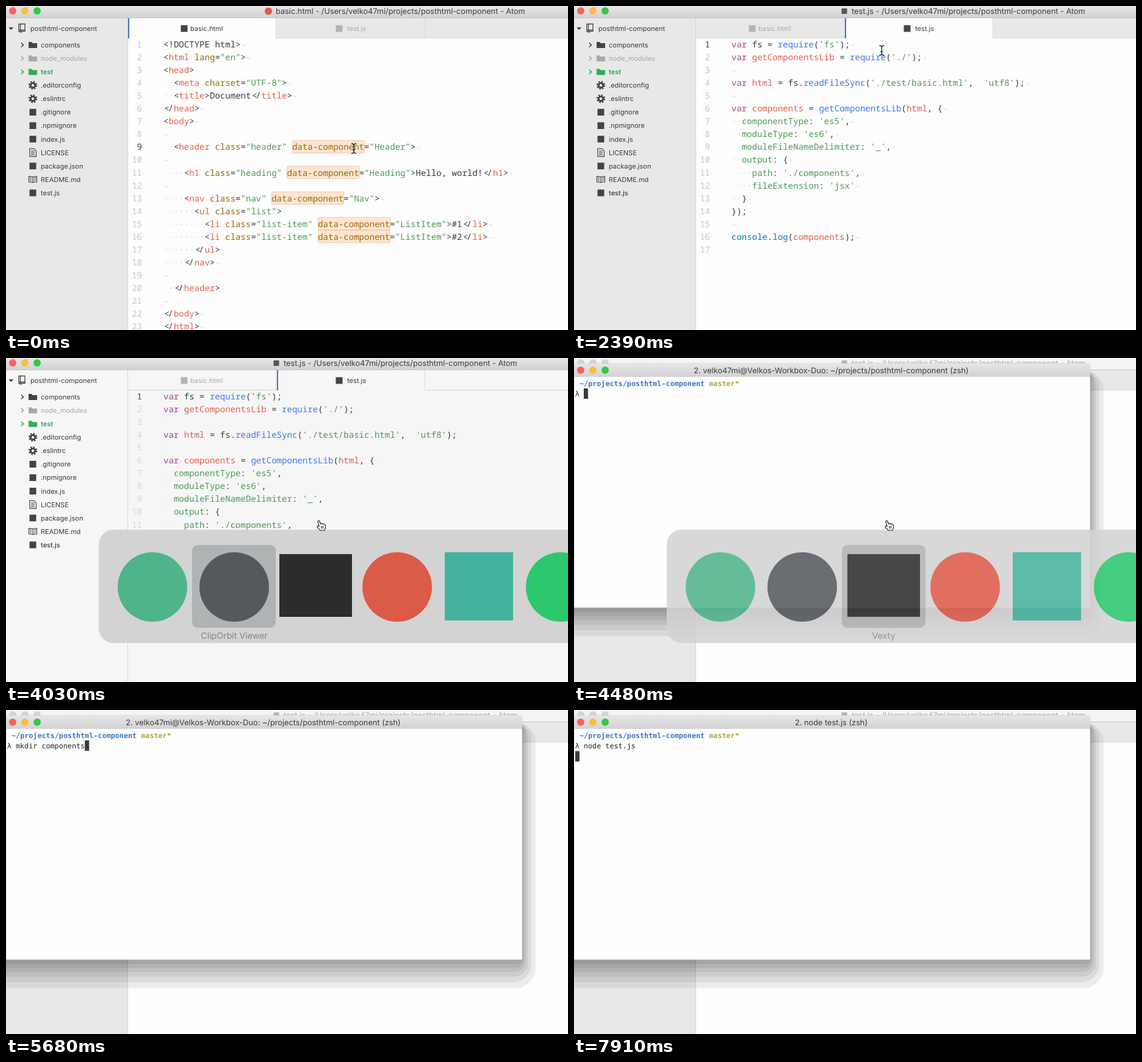
An HTML page that plays this animation: 921 px wide and 532 px high, repeating every 8000 ms.

```html
<!DOCTYPE html>
<html lang="en">
<head>
<meta charset="utf-8">
<title>Editor and terminal</title>
<style>
  html, body { margin: 0; width: 100%; height: 100%; overflow: hidden; background: #fdfdfd; }
  svg { display: block; width: 100vw; height: 100vh; }
  text { white-space: pre; text-rendering: geometricPrecision; font: 11px Inter, sans-serif; fill: #3a3a3a; }
  .title { font-size: 12.75px; fill: #3c3c3c; }
  .code text { font: 14.07px "Noto Sans Mono", monospace; fill: #383a42; }
  .code .num { fill: #c6c6c6; text-anchor: end; }
  .code .current { fill: #444; }
  .ws { fill: #d2d2d2; }
  .eol { fill: #d2d2d2; font-size: 11px; }
  .red { fill: #e0604c; } .gold { fill: #9a6a0a; } .green { fill: #4b9a55; }
  .purple { fill: #a0409f; } .blue { fill: #4078e8; } .cyan { fill: #0a78b8; font-weight: 500; }
  .mark { fill: #fde5d3; stroke: #f2c5a5; }
  .panel { fill: #e8e8e8; }
  .paper { fill: #fdfdfd; }
  .muted { fill: #a8a8a8; }
  .pale .panel, .pale .paper { fill: #f6f6f6; }
  .pale .ws, .pale .eol { fill: #ececec; }
  .pale .code .num:not(.current) { fill: #d6d6d6; }
  .inactive .title { fill: #aaa; }
  .inactive .bar { fill: #f5f5f5; }
  .inactive .light { fill: #d4d4d4; }
  .term text { font: 11.75px "DejaVu Sans Mono", monospace; fill: #222; }
  .term .title { font: 12.75px Inter, sans-serif; fill: #3c3c3c; text-anchor: middle; }
  .term .path { font-weight: bold; fill: #3a74c8; }
  .term .branch { font-weight: bold; fill: #b8a640; }
  .label { font-size: 14.2px; fill: #858585; text-anchor: middle; }
</style>
</head>
<body>
<svg viewBox="0 0 921 532" preserveAspectRatio="none">
  <defs>
    <linearGradient id="bar" x2="0" y2="1"><stop stop-color="#e6e6e6"/><stop offset="1" stop-color="#d2d2d2"/></linearGradient>
    <g id="gear" fill="none" stroke="#444">
      <circle r="3.7" stroke-width="3"/><circle r="6" stroke-width="2.4" stroke-dasharray="2.36 2.35"/>
    </g>
    <path id="folder" d="M-7-5h5l1.5 2h7.5v8h-14z"/>
    <path id="file" d="M-5-6.5h7l3.5 3.5v9.5h-10.5zM-3-2.5h6M-3 .5h6M-3 3.5h6" fill="none" stroke="#444" stroke-width="1.2"/>
    <path id="book" d="M0-4C-2-5-4-5-6.5-5V4C-4 4-2 4 0 5C2 4 4 4 6.5 4V-5C4-5 2-5 0-4V5M-5-2h3M-5 1h3M2-2h3M2 1h3" fill="none" stroke="#444" stroke-width="1.2"/>
    <path id="repo" d="M-5-6.5h10v10h-10zM-2.5-6.5v10M-5 3.5v2h2v1.5l1-1 1 1v-1.5h6v-2" fill="none" stroke="#444" stroke-width="1.3"/>
    <rect id="badge" x="-5.5" y="-5.5" width="11" height="11"/>
    <path id="arrow" d="M0 0V13.5L3.2 10.6 5.2 15.3 7.4 14.3 5.4 9.8H9.6Z" fill="#111" stroke="#fff"/>
    <path id="beam" d="M-4-8Q0-8 0-5Q0-8 4-8M0-5V5M-4 8Q0 8 0 5Q0 8 4 8M-2 2H2" fill="none" stroke="#222" stroke-width="1.4"/>
    <path id="hand" d="M-3 1L-5-6Q-4.5-9-2.5-7.5L-.5-2.5Q1-4 2.5-2.5Q4-3.5 5-2Q7-2.5 7.5 0V4L6 8H-1L-6 2.5Q-6-.5-3 1ZM1 1V5M3.5 1V5" fill="#fff" stroke="#222" stroke-width="1.2"/>
  </defs>

  <g id="editor">
    <rect class="paper" width="921" height="532"/>
    <rect class="panel" y="20" width="199" height="512"/>
    <rect class="panel" x="200" y="20" width="721" height="33"/>
    <path d="M199.5 20V532M200 52.5H921" stroke="#d4d4d4"/>
    <rect class="bar" width="921" height="19" fill="url(#bar)"/>
    <path d="M0 19.5H921" stroke="#c2c2c2"/>
    <g class="lights" transform="translate(0 8)"></g>
    <g id="titleIcon"></g>
    <text id="title" class="title" y="13"></text>
    <g id="sidebar"></g>
    <g id="tabs"></g>
    <g id="html" class="code"></g>
    <g id="js" class="code"></g>
  </g>

  <g id="term" class="term">
    <g id="shadow"></g>
    <path d="M0 9H841Q846 9 846 14V410H0Z" fill="#fefefe" stroke="#b4b4b4" stroke-width=".6"/>
    <path d="M0 9H841Q846 9 846 14V31H0Z" fill="url(#bar)"/>
    <g class="lights" transform="translate(0 20)"></g>
    <text id="termTitle" class="title" x="421.5" y="25"></text>
    <text class="path" x="9" y="46">~/projects/posthtml-component <tspan class="branch">master*</tspan></text>
    <text id="command" x="1.8" y="63"></text>
    <rect id="block" width="7" height="17" fill="#3a3a3a"/>
  </g>

  <g id="switcher">
    <rect x="152" y="282" width="820" height="186" rx="24" fill="#d3d3d3"/>
    <rect id="pick" y="307" width="137" height="136" rx="9" fill="#b0b3b3"/>
    <circle cx="240" cy="376" r="57" fill="#4fb48a"/>
    <circle cx="374" cy="376" r="57" fill="#55585d"/>
    <rect x="448" y="322" width="119" height="103" fill="#2c2c2c"/>
    <circle cx="641" cy="376" r="57" fill="#dc5a48"/>
    <rect x="719" y="319" width="112" height="112" fill="#45b29d"/>
    <circle cx="909" cy="376" r="57" fill="#2cc76d"/>
    <text id="label" class="label" y="461"></text>
  </g>
  <use id="pointer"/>
</svg>
<script>
const $ = id => document.getElementById(id);
const show = (id, on) => $(id).style.display = on ? '' : 'none';
const escape = s => s.replace(/&/g, '&amp;').replace(/</g, '&lt;');
const icon = (name, x, y, fill = '#444') => `<use href="#${name}" x="${x}" y="${y}" fill="${fill}"/>`;

// Code panes
const CELL = 8.444, LEFT = 258, ROW = 21.05, BASE = 68;

const htmlRules = [
  [/^ +/y, 'ws'], [/<\/?/y, ''], [/(?<=<\/?)\w+/y, 'red'],
  [/[\w-]+(?==)/y, 'gold'], [/"[^"]*"/y, 'green'], [/[^<"]/y, '']
];
const jsRules = [
  [/^ +/y, 'ws'], [/'[^']*'/y, 'green'], [/var\b/y, 'purple'], [/\w+(?=:)/y, 'green'],
  [/console|log(?=\()/y, 'cyan'], [/\w+(?=\()/y, 'blue'],
  [/getComponentsLib|components|html/y, 'red'], [/\w+/y, ''], [/./y, '']
];

function colour(line, rules) {
  let out = '', at = 0, joined = false;
  while (at < line.length) {
    for (const [rule, cls] of rules) {
      rule.lastIndex = at;
      const found = rule.exec(line);
      if (!found) continue;
      const word = cls === 'ws' ? '·'.repeat(found[0].length) : found[0];
      at += word.length;
      out += word === '</'
        ? '<tspan dx="1.5">&lt;</tspan><tspan dx="-2.5">/</tspan>'
        : `<tspan class="${cls}"${joined ? ' dx="1"' : ''}>${escape(word)}</tspan>`;
      joined = word === '</';
      break;
    }
  }
  return out;
}

function codePane(source, rules, current, marked) {
  const lines = source.split('\n');
  return lines.map((line, i) => {
    const y = BASE + i * ROW, col = marked ? line.indexOf(marked) : -1;
    const mark = col < 0 ? '' : `<rect class="mark" x="${LEFT + col * CELL}" y="${y - 15.5}" width="${marked.length * CELL}" height="20.5" rx="2"/>`;
    const end = i < lines.length - 1 || marked ? '<tspan class="eol" dx="1">¬</tspan>' : '';
    return mark +
      `<text class="num${i + 1 === current ? ' current' : ''}" x="223" y="${y}">${i + 1}</text>` +
      `<text x="${LEFT}" y="${y}">${colour(line, rules)}${end}</text>`;
  }).join('');
}

$('html').innerHTML = codePane(`<!DOCTYPE html>
<html lang="en">
<head>
  <meta charset="UTF-8">
  <title>Document</title>
</head>
<body>

  <header class="header" data-component="Header">

    <h1 class="heading" data-component="Heading">Hello, world!</h1>

    <nav class="nav" data-component="Nav">
      <ul class="list">
        <li class="list-item" data-component="ListItem">#1</li>
        <li class="list-item" data-component="ListItem">#2</li>
      </ul>
    </nav>

  </header>

</body>
</html>`, htmlRules, 9, 'data-component');

$('js').innerHTML = codePane(`var fs = require('fs');
var getComponentsLib = require('./');

var html = fs.readFileSync('./test/basic.html',  'utf8');

var components = getComponentsLib(html, {
  componentType: 'es5',
  moduleType: 'es6',
  moduleFileNameDelimiter: '_',
  output: {
    path: './components',
    fileExtension: 'jsx'
  }
});

console.log(components);
`, jsRules, 1);

// Window furniture
document.querySelectorAll('.lights').forEach(g => g.innerHTML =
  ['#fc605b', '#fdbc40', '#34c84a'].map((c, i) => `<circle class="light" cx="${11 + 20 * i}" r="6" fill="${c}"/>`).join(''));

const folders = [['components', '#444', '#3a3a3a'], ['node_modules', '#aaa', '#a8a8a8'], ['test', '#2fae5a', '#2aa854']];
const files = [['.editorconfig', 'gear'], ['.eslintrc', 'gear'], ['.gitignore', 'badge'], ['.npmignore', 'badge'],
  ['index.js', 'badge'], ['LICENSE', 'file'], ['package.json', 'badge'], ['README.md', 'book'], ['test.js', 'badge']];
const rowY = i => 64 + 22.08 * i;

function sidebar(selected) {
  $('sidebar').innerHTML =
    `<path d="M4.5 35h7.5l-3.7 4.5z" fill="#444"/>${icon('repo', 26, 36)}<text x="40" y="41">posthtml-component</text>` +
    folders.map(([name, fill, ink], i) => {
      const y = rowY(i), weight = name === 'test' ? 600 : 400;
      return `<path d="M25 ${y - 3.5}l3.5 3.5-3.5 3.5" fill="none" stroke="${fill}" stroke-width="1.7"/>` +
        icon('folder', 44, y, fill) +
        `<text x="57" y="${y + 4}" style="fill:${ink};font-weight:${weight}">${name}</text>`;
    }).join('') +
    files.map(([name, kind], i) => {
      const y = rowY(i + folders.length), weight = name === selected ? 500 : 400;
      return icon(kind, 44, y) + `<text x="57" y="${y + 4}" style="font-weight:${weight}">${name}</text>`;
    }).join('');
}

function tabs(active, hovered) {
  const list = [['basic.html', 200, 292, 302], ['test.js', 444, 546, 559]];
  $('tabs').innerHTML = list.map(([name, x, iconX, textX], i) => {
    const on = i === active;
    return (on ? `<rect class="paper" x="${x}" y="20" width="242" height="33"/><rect x="${x}" y="20" width="2" height="33" fill="#4a6cc8"/>` : '') +
      icon('badge', iconX, 37, on ? '#444' : '#b4b4b4') +
      `<text x="${textX}" y="41"${on ? '' : ' class="muted"'}>${name}</text>`;
  }).join('') + '<path d="M686.5 20V52M442.5 20V52" stroke="#dadada"/>' +
    (hovered ? '<path d="M669 34.5l5 5m0-5l-5 5" stroke="#999" stroke-width="1.6"/>' : '');
}

$('shadow').innerHTML = [[868, 457], [861, 447], [856, 438], [852, 430], [849, 424], [847, 417]]
  .map(([x, y], i) => `<rect x="-60" y="20" width="${x + 60}" height="${y - 20}" rx="${34 - 5 * i}" fill-opacity=".068"/>`).join('');

const LOOP = 8000, STEP = 448 / 3;
const route = [[0, 570, 234], [4, 572, 236], [7, 566, 190], [10, 520, 70], [12, 497, 39], [14, 497, 39],
  [17, 508, 90], [21, 519, 139], [23, 518, 190], [26, 516, 275], [60, 516, 275]];
const ramp = (v, from, to) => Math.min(1, Math.max(0, (v - from) / (to - from)));

function along(n) {
  const i = route.findIndex((stop, k) => k && n <= stop[0]);
  const [a, b] = [route[i - 1], route[i]], u = ramp(n, a[0], b[0]);
  return [a[1] + (b[1] - a[1]) * u, a[2] + (b[2] - a[2]) * u];
}

function typed(n) {
  if (n < 45) return 'mkdir components'.slice(0, Math.round(16 * Math.min(ramp(n, 31, 37), ramp(n, 44, 40))));
  return 'node test.js'.slice(0, Math.round(12 * ramp(n, 45, 52)));
}

function draw(n) {
  const inScript = n >= 12, scriptOpen = n >= 13, inTerm = n >= 30, running = n >= 53;

  $('title').textContent = `${inScript ? 'test.js' : 'basic.html'} - /Users/velko47mi/projects/posthtml-component - Atom`;
  $('title').setAttribute('x', inScript ? 455 : 442);
  $('titleIcon').innerHTML = inScript
    ? '<rect x="438.5" y="4" width="9" height="9" fill="#555"/>'
    : '<circle cx="430" cy="8.5" r="6" fill="#dc5a48"/>';
  $('titleIcon').style.opacity = inTerm ? .4 : 1;
  $('editor').setAttribute('class', inTerm ? 'inactive' : n >= 26 ? 'pale' : '');
  sidebar(scriptOpen ? 'test.js' : '');
  tabs(scriptOpen ? 1 : 0, n >= 11 && n < 13);
  show('html', !scriptOpen);
  show('js', scriptOpen);

  show('term', inTerm);
  const text = typed(n);
  $('termTitle').textContent = running ? '2. node test.js (zsh)'
    : '2. velko47mi@Velkos-Workbox-Duo: ~/projects/posthtml-component (zsh)';
  $('command').textContent = 'λ ' + text;
  $('block').setAttribute('x', running ? 2 : 16 + 7.073 * text.length);
  $('block').setAttribute('y', running ? 67.5 : 50);

  const choice = n < 28 ? 0 : 1;
  show('switcher', n >= 26 && n < 32);
  $('switcher').style.opacity = n < 30 ? 1 : n < 31 ? .87 : .4;
  $('pick').setAttribute('x', 305 + 134 * choice);
  $('label').setAttribute('x', 374 + 133.5 * choice);
  $('label').textContent = ['ClipOrbit Viewer', 'Vexty'][choice];

  const [x, y] = along(n);
  show('pointer', n < 32);
  $('pointer').setAttribute('href', n >= 25 ? '#hand' : y < 52 ? '#arrow' : '#beam');
  $('pointer').setAttribute('transform', `translate(${x} ${y})`);
}

let last = -1;
function tick() {
  const n = Math.floor((performance.now() % LOOP + 6) / STEP);
  if (n !== last) draw(last = n);
  requestAnimationFrame(tick);
}
tick();
</script>
</body>
</html>
```
